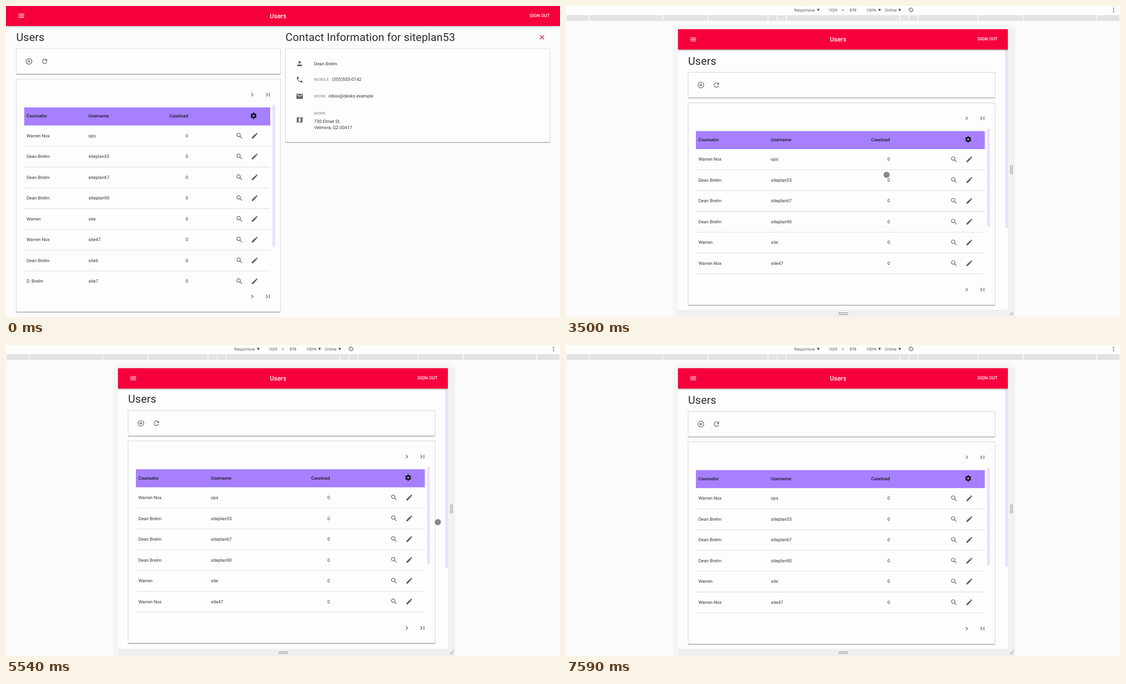
Animation, 998 px wide and 561 px high, one loop 8000 ms. Source, as an HTML page:

```html
<!DOCTYPE html>
<html lang="en">
<head>
<meta charset="utf-8">
<title>Users</title>
<style>
html, body { margin: 0; width: 100%; height: 100%; overflow: hidden; background: #fcfcfc; }
#stage { display: block; width: 100%; height: 100%; font-family: Roboto, sans-serif; fill: #363636; text-rendering: geometricPrecision; }
.bar { fill: #f5003d; filter: drop-shadow(0 1.5px 1.5px #0005); }
.med { font-weight: 500; fill: #1c1c1c; }
.white { font-weight: 500; fill: #fff; }
.head { letter-spacing: .0074em; fill: #2a2a2a; }
.label { letter-spacing: .4px; fill: #777; }
.tool { font-family: "Open Sans", sans-serif; fill: #444; }
.thumb { fill: #e9e0ff; }
</style>
</head>
<body>
<svg id="stage" viewBox="0 0 998 561"></svg>
<script>
const LOOP = 8000, FRAME = 137, SCALE = .577, BODY = 8.08, TITLE = 19.62, TABLE_H = 417.5;

const line = d => `<path d="${d}" fill="none" stroke="currentColor" stroke-width="2"/>`;
const solid = d => `<path d="${d}" fill="currentColor"/>`;

// drawn on a 24 unit grid
const ICONS = {
  menu: line('M3 7h18M3 12h18M3 17h18'),
  add: line('M12 7v10M7 12h10M12 3a9 9 0 1 0 .01 0'),
  refresh: line('M18.7 14A7 7 0 1 1 17 7') + solid('M13 11h7V4z'),
  next: line('M9.3 6.7l5.3 5.3-5.3 5.3'),
  last: line('M6.3 6.7l5.3 5.3-5.3 5.3M17 6v12'),
  search: line('M9.5 4a5.5 5.5 0 1 0 .01 0M13.5 13.5l6.3 6.3'),
  edit: solid('M3 17.3V21h3.7L17.8 10 14 6.2zM15 5.2l2-2h1.6l2.2 2.2V7l-2 2z'),
  close: line('M5.7 5.7l12.6 12.6M18.3 5.7L5.7 18.3'),
  person: solid('M12 4a4 4 0 1 0 .01 0M4 20v-2c0-5 16-5 16 0v2z'),
  phone: solid('M4 3h4l1.2 5-2.6 2.8q2 4.4 6.6 6.6l2.8-2.6 5 1.2v4l-1 1A17 17 0 0 1 3 4z'),
  mail: solid('M2 4h20v16H2z') + '<path d="M4 7l8 5 8-5" fill="none" stroke="#fdfdfd" stroke-width="2"/>',
  map: solid('M3 5l6-2v16l-6 2zM15 5l6-2v16l-6 2zM9 3l6 2.1V7L9 5zM9 17l6 2.1V21l-6-2z'),
  gear: '<circle cx="12" cy="12" r="5.4" fill="none" stroke="currentColor" stroke-width="3.8"/>' +
    Array.from({ length: 6 }, (_, i) =>
      `<path d="M9.2 6l.9-3.8h3.8l.9 3.8z" fill="currentColor" transform="rotate(${i * 60} 12 12)"/>`).join('')
};

const USERS = [
  ['Warren Nox', 'ops'], ['Dean Brelm', 'siteplan53'], ['Dean Brelm', 'siteplan67'],
  ['Dean Brelm', 'siteplan90'], ['Warren', 'site'], ['Warren Nox', 'site47'],
  ['Dean Brelm', 'site6'], ['D. Brelm', 'site7'], ['Dean B', 'site8'], ['D. B.', 'site9']
];

// pointer path: frame, x, y
const PATH = [
  [0, 43, 119.5], [1, 166, 114], [3, 446, 184.5], [5, 502, 249], [8, 571.5, 321.5],
  [9, 527.5, 346], [10, 684.5, 319.5], [11, 732, 300.5], [13, 577.5, 304.5],
  [17, 574, 309.5], [22, 574, 309.5], [23, 791.5, 371], [24, 857, 347], [25, 825, 334],
  [27, 778, 319.5], [40, 778, 319.5], [41, 694.5, 318.5], [42, 388, 320]
];

const text = (x, cy, str, size = BODY, attrs = '') =>
  `<text x="${x}" y="${cy + size * .357}" font-size="${size}" ${attrs}>${str}</text>`;
const rect = (x, y, w, h, attrs = '') =>
  `<rect x="${x}" y="${y}" width="${w}" height="${h}" ${attrs}/>`;
const move = (x, y, body) => `<g transform="translate(${x} ${y})">${body}</g>`;
const view = (x, y, w, h, body) =>
  `<svg x="${x}" y="${y}" width="${w}" height="${h}" overflow="hidden">${body}</svg>`;
const icon = (name, cx, cy, color = '#636363') =>
  `<g transform="translate(${cx} ${cy}) scale(${SCALE}) translate(-12 -12)" color="${color}">${ICONS[name]}</g>`;
const card = (x, y, w, h) =>
  rect(x, y, w, h, 'rx=".8" fill="#fdfdfd" stroke="#0002" stroke-width="1.2"') +
  rect(x, y + h - .4, w, 1.4, 'rx=".6" fill="#0004"');
const thumb = (x, y, h) => rect(x, y, 5, h, 'rx="2" class="thumb"');

function table(w, h, userX, loadX, scroll) {
  const right = 'text-anchor="end"', med = 'class="med"';
  const header = rect(0, 4.5, w, 32.5, 'fill="#a680ff"') +
    text(4.5, 20, 'Counselor', BODY, med) + text(userX, 20, 'Username', BODY, med) +
    text(loadX, 20, 'Caseload', BODY, `${med} ${right}`) + icon('gear', w - 30, 19.5, '#111');
  const rows = USERS.map(([name, user], i) => {
    const y = 55.5 + 37.5 * i;
    return text(4.5, y, name) + text(userX, y, user) + text(loadX, y, 0, BODY, right) +
      icon('search', w - 55.5, y) + icon('edit', w - 28, y) +
      rect(0, y + 18.6, w, .8, 'fill="#d8d8d8"');
  }).join('');
  return move(0, -scroll, header + rows) +
    thumb(w + 4, scroll * h / TABLE_H, h * h / TABLE_H);
}

function users(w, h, userX, loadX, scroll = 0) {
  const right = 18.5 + w, tableW = w - 32.5, tableH = h - 93.4;
  const pager = y => icon('next', right - 51, y) + icon('last', right - 23, y);
  return text(18.5, 56, 'Users', TITLE, 'class="head"') +
    card(18.5, 77, w, 46) + icon('add', 41.5, 100) + icon('refresh', 69.5, 100) +
    card(18.5, 132, w, h) + pager(160) + pager(104 + h) +
    view(32.5, 178.5, tableW + 10, tableH, table(tableW, tableH, userX, loadX, scroll));
}

// x positions are relative to the card's left edge
function contact(w) {
  const label = (y, str) => text(51.5, y, str, 6.92, 'class="label"');
  return text(0, 56, 'Contact Information for siteplan53', TITLE, 'class="head"') +
    icon('close', w - 14.5, 56.5, '#b00020') + card(0, 77, w, 169) +
    icon('person', 25.5, 104) + text(51.5, 104, 'Dean Brelm') +
    icon('phone', 25.5, 133) + label(132.3, 'MOBILE') + text(83.5, 131.8, '(555)555-0142') +
    icon('mail', 25.5, 163) + label(162.7, 'WORK') + text(77.5, 162.3, 'inbox@desks.example') +
    icon('map', 25.5, 205.5) + label(193.2, 'WORK') +
    text(51.5, 208, '730 Elmet St.') + text(51.5, 219.5, 'Velmora, QZ 00417');
}

const appBar = (w, titleX, endX) => rect(0, -1, w, 37, 'class="bar"') +
  icon('menu', 27.7, 17.5, '#fff') +
  text(titleX, 17.5, 'Users', 11.54, 'class="white" text-anchor="middle"') +
  text(endX, 17, 'SIGN OUT', BODY, 'class="white" text-anchor="end"');

const widePage = () => users(476, 420, 116, 295.5) +
  move(503.5, 0, contact(476.5)) + appBar(998, 490, 979.5);

const narrowPage = (tableScroll, pageScroll) =>
  move(0, -pageScroll, users(553, 365, 135, 349.5, tableScroll) + move(18.5, 469.8, contact(553))) +
  thumb(589.7, 36 + pageScroll * .686, 322) + appBar(595, 288.5, 576);

function toolbar() {
  const word = (x, str) => text(x, 7.5, str, 7.1, 'class="tool"');
  const arrow = x => `<path d="M${x} 5.2h4.6l-2.3 4.6z" fill="#444"/>`;
  const tick = x => rect(x - .6, 16, 1.2, 11.5, 'fill="#fff"');
  return rect(0, 0, 998, 15.5, 'fill="#fdfdfd"') + rect(1, 16.5, 996, 10.5, 'fill="#e3e3e3"') +
    [102, 118.5, 135, 243, 324.5, 457].map(d => tick(499 - d) + tick(499 + d)).join('') +
    word(411, 'Responsive') + arrow(452.2) + word(472.7, '1029') + word(496.5, '×') +
    word(511, '878') + word(541, '100%') + arrow(562.7) + word(574, 'Online') + arrow(599) +
    `<g fill="none" stroke="#666" stroke-width=".8"><circle cx="621.5" cy="7" r="3.8"/>
    <rect x="619.8" y="4.2" width="3.4" height="5.6" transform="rotate(-45 621.5 7)"/></g>` +
    [4, 7.2, 10.4].map(y => `<circle cx="986.3" cy="${y}" r="1" fill="#555"/>`).join('');
}

const grips = '<path d="M801 287.5v16M804 287.5v16M491 553.5h17M491 556.5h17M799 558l7-7M803 558l3-3" fill="none" stroke="#858585"/>';

const device = page => rect(0, 0, 998, 561, 'fill="#fbfbfb"') + toolbar() +
  rect(193, 33, 616, 545, 'rx="11" fill="#f5f5f5"') +
  rect(796, 41.6, 13, 520, 'fill="#f1f1f1"') + rect(202, 548, 594, 13, 'fill="#f0f0f0"') +
  view(201.5, 41.6, 594.5, 506.4, rect(0, 0, 595, 507, 'fill="#fdfdfd"') + move(0, 1, page));

// a touch dot inside the page, an arrow outside it
function pointer(frame) {
  const next = PATH.findIndex(p => p[0] >= frame);
  if (frame < 0 || next < 0) return '';
  const [f1, x1, y1] = PATH[next], [f0, x0, y0] = PATH[Math.max(next - 1, 0)];
  const u = f1 > f0 ? (frame - f0) / (f1 - f0) : 1;
  const x = x0 + (x1 - x0) * u, y = y0 + (y1 - y0) * u;
  return x > 202 && x < 796
    ? `<circle cx="${x}" cy="${y}" r="5.5" fill="#444" opacity=".62"/>`
    : move(x, y, '<path d="M.4.5V9.6L2.4 7.8 3.8 11.2 5.2 10.6 3.8 7.3H6.5z" fill="#fff" stroke="#222" stroke-width=".8"/>');
}

function ease(frame, start, end) {
  const u = Math.min(1, Math.max(0, (frame - start) / (end - start)));
  return u * u * (3 - 2 * u);
}

function scene(t) {
  if (t < 500) return widePage();
  if (t < 640) return device(widePage());
  const frame = Math.floor((t - 1688) / FRAME);
  const tableScroll = 145.5 * (ease(frame, 13, 15) - ease(frame, 19, 23));
  const pageScroll = 214.5 * (ease(frame, 27.9, 30) - ease(frame, 36, 38));
  return device(narrowPage(tableScroll, pageScroll)) + grips + pointer(frame);
}

const stage = document.getElementById('stage');
let shown;
function tick() {
  const picture = scene(performance.now() % LOOP);
  if (picture !== shown) stage.innerHTML = shown = picture;
  requestAnimationFrame(tick);
}
tick();
</script>
</body>
</html>
```
